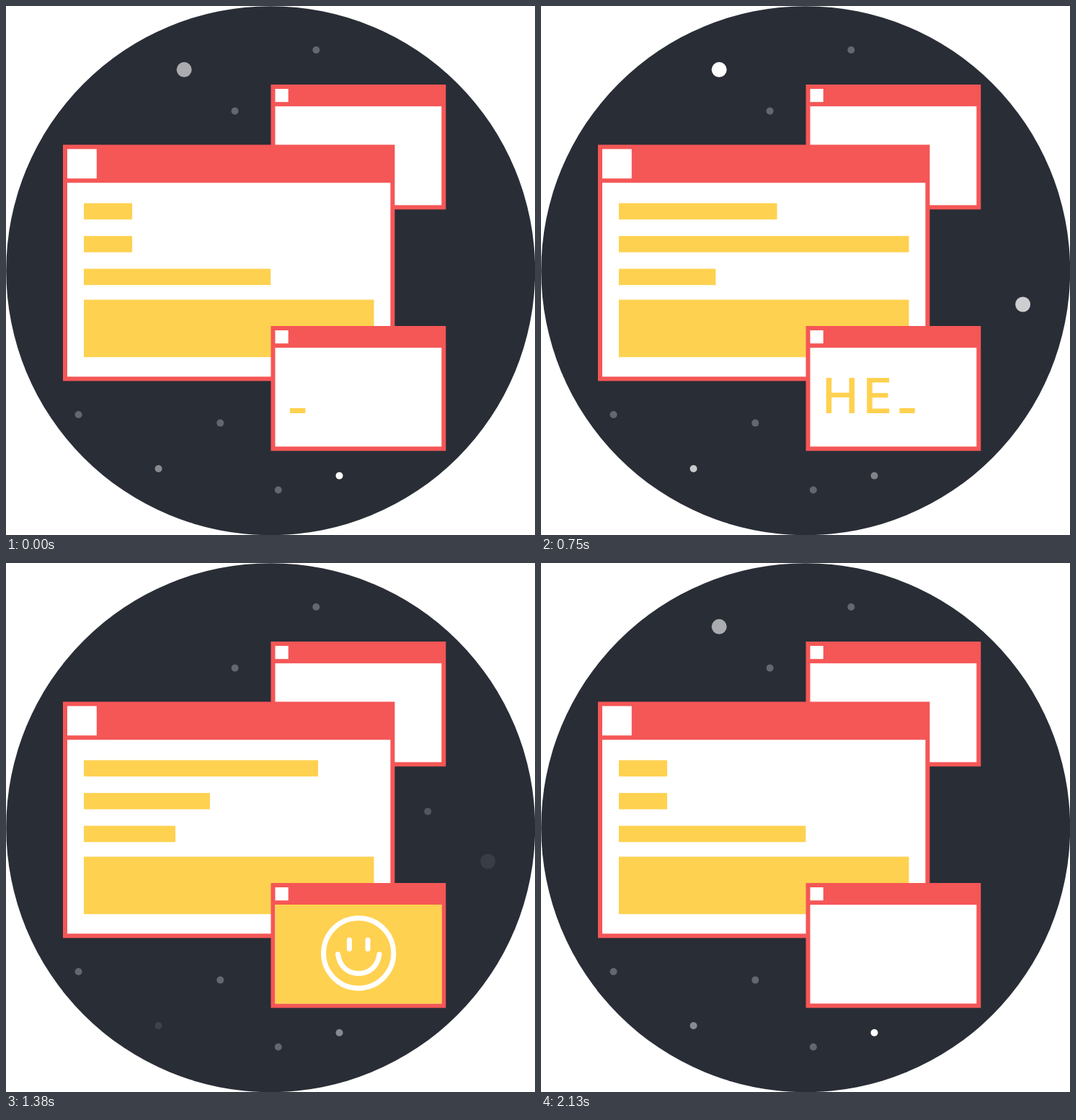
Recreate the animation shown at these times as an HTML page. Size 734x734 px, loop 2160 ms.

```html
<!DOCTYPE html>
<html lang="en">
<head>
<meta charset="utf-8">
<title>Windows in space</title>
<style>
  html, body { margin: 0; height: 100%; overflow: hidden; background: #fff; }
  svg { display: block; width: 100vw; height: 100vh; }
  .red { fill: #f55656; }
  .yellow { fill: #ffd150; }
  .white { fill: #fff; }
  .line { fill: none; stroke: #fff; stroke-width: 7; stroke-linecap: round; }
  text { font: 500 67.5px Inter, "Liberation Sans", sans-serif; text-anchor: middle; }
</style>
</head>
<body>
<svg id="stage" viewBox="0 0 734 734">
  <circle cx="367.2" cy="367.2" r="367" fill="#292d36"/>
</svg>
<script>
const FRAME = 30, CYCLE = 1080, LOOP = 2 * CYCLE, LAST = CYCLE - FRAME;
const WORD = "HEZ", CELL = 51.7, TYPE_START = 660, TYPE_STEP = 90;
const BORDER = 6, FULL = 402.5;
const stage = document.getElementById("stage");

function add(tag, attrs, parent = stage) {
  const el = document.createElementNS("http://www.w3.org/2000/svg", tag);
  for (const name in attrs) el.setAttribute(name, attrs[name]);
  return parent.appendChild(el);
}
const box = (cls, x, y, width, height, parent) =>
  add("rect", { class: cls, x, y, width, height }, parent);
const show = (el, on) => el.setAttribute("visibility", on ? "visible" : "hidden");

// A window: red frame, square button in the title bar, white page
function pane(x, y, w, h, button) {
  const head = button + 2 * BORDER;
  box("red", x, y, w, h);
  box("white", x + BORDER, y + BORDER, button, button);
  box("white", x + BORDER, y + head, w - 2 * BORDER, h - head - BORDER);
}
const smallPane = y => pane(367.5, y, 242.8, 173.3, 18.2);

// Linear motion from a rest value through [time, value] turns and back to rest
const moves = [];
function move(el, attr, rest, ...turns) {
  moves.push({ el, attr, keys: [[0, rest], ...turns, [LAST, rest]] });
}
function valueAt(keys, t) {
  const i = Math.max(1, keys.findIndex(k => k[0] >= t));
  const [t0, v0] = keys[i - 1], [t1, v1] = keys[i];
  return v0 + (v1 - v0) * (t - t0) / (t1 - t0);
}

// Stars: steady unless given a twinkle
function star(cx, cy, r = 5, ...twinkle) {
  const el = add("circle", { class: "white", cx, cy, r, opacity: 0.28 });
  if (twinkle.length) move(el, "opacity", ...twinkle);
}
star(430.3, 61);
star(317.6, 145.8);
star(100.6, 567);
star(297.3, 578.6);
star(377.8, 671.5);
star(247.2, 88.3, 10.5, 0.6, [300, 0], [750, 1]);
star(668.6, 414, 10.5, 0, [270, 0], [660, 1]);
star(585.2, 344.8, 5, 0, [270, 0], [420, 1], [600, 0]);
star(211.6, 642, 5, 0.45, [390, 0], [870, 1]);
star(462.5, 651.8, 5, 1, [540, 0]);

smallPane(109);
pane(79, 192.5, 460.4, 327.8, 40.8);

// Three sliding bars above a solid block
const bars = [0, 1, 2].map(i => box("yellow", 108, 273.6 + 45.5 * i, 0, 22.6));
move(bars[0], "width", FULL / 6, [390, FULL]);
move(bars[1], "width", FULL / 6, [300, 175], [570, 217.5], [750, FULL]);
move(bars[2], "width", 259.3, [510, 34.5]);
box("yellow", 108, 407.5, FULL, 79.7);

smallPane(444);

const letters = [...WORD].map((char, i) => {
  const el = add("text", { class: "yellow", x: 415.3 + i * CELL, y: 565 });
  el.textContent = char;
  return el;
});
const cursor = box("yellow", 394, 558, 21.4, 7);

const smiley = add("g");
box("yellow", 373.5, 474, 231.2, 137.5, smiley);
add("circle", { class: "line", cx: 489.2, cy: 541.3, r: 48.6 }, smiley);
add("path", {
  class: "line",
  d: "M476.4 523v12.5M502 523v12.5M460.6 543C463 560 474.5 569.6 489.3 569.6S515.6 560 518 543"
}, smiley);

function draw(now) {
  const t = Math.floor(now % LOOP / FRAME) * FRAME;
  for (const { el, attr, keys } of moves) el.setAttribute(attr, valueAt(keys, t % CYCLE));

  // Blinking cursor, then typing, then the smiley
  const steps = Math.floor((t - TYPE_START) / TYPE_STEP) + 1;
  const typed = Math.max(0, Math.min(WORD.length, steps));
  const typing = t < CYCLE;
  letters.forEach((el, i) => show(el, typing && i < typed));
  cursor.setAttribute("x", 394 + typed * CELL);
  show(cursor, typing && (typed > 0 || t % 300 < 150));
  show(smiley, !typing && t < LOOP - 90);
}

const start = performance.now();
function tick() {
  draw(performance.now() - start);
  requestAnimationFrame(tick);
}
tick();
</script>
</body>
</html>
```
